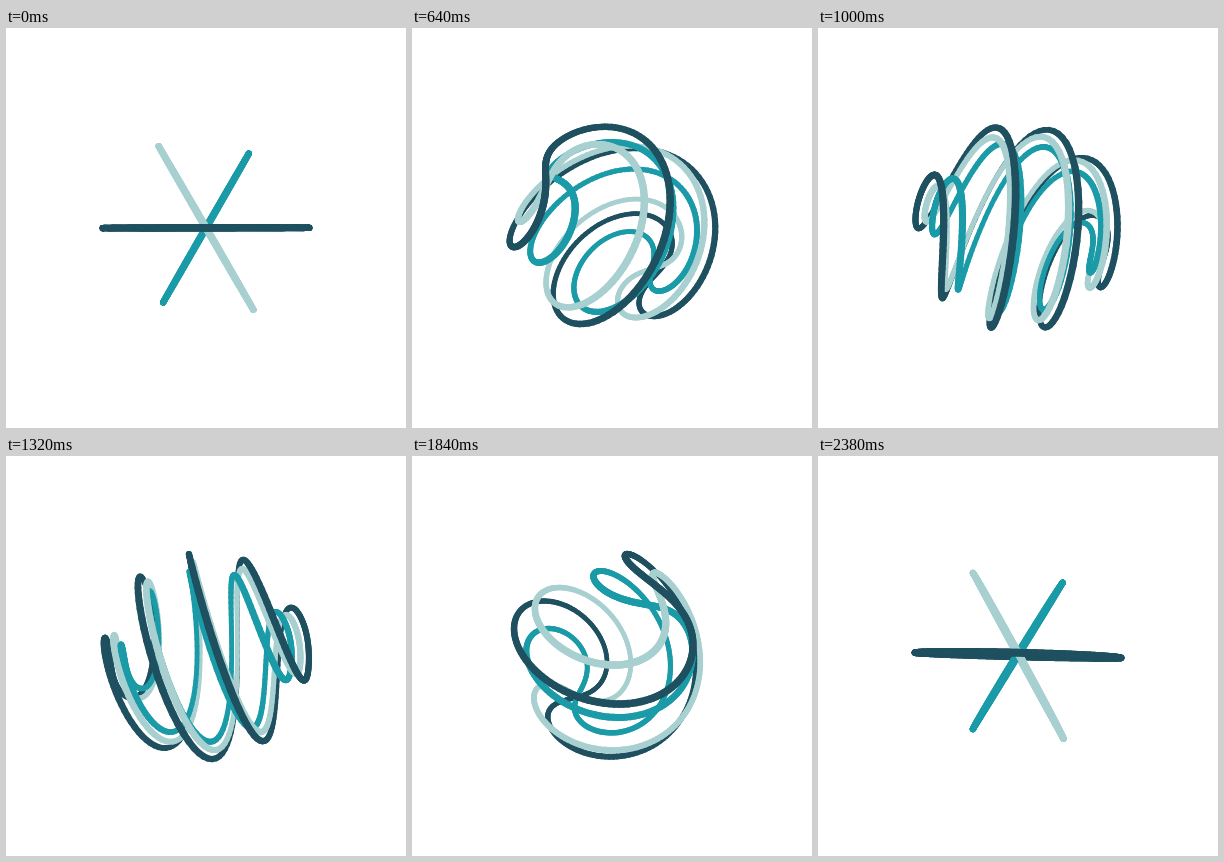
Animation of 400x400 px, one loop 2.4 s. Source, as an HTML page with a canvas:

```html
<!DOCTYPE html>
<html lang="en">
<head>
<meta charset="utf-8">
<title>Twisting rings</title>
<style>
  html, body { margin: 0; width: 100%; height: 100%; overflow: hidden; background: #fff; }
  canvas { display: block; width: 400px; height: 400px; }
</style>
</head>
<body>
<canvas id="stage" width="400" height="400"></canvas>
<script>
const LOOP = 2400;
const STEPS = 360;
const EYE = 400;
const WEIGHT = 5.8;
const TAU = Math.PI * 2;

// fan: start angle of the ring, as a share of 60 degrees
const rings = [
  { radius: 84, color: '#1b9ba8', fan: -1 },
  { radius: 92, color: '#a8d0d0', fan: 1 },
  { radius: 100, color: '#1f5060', fan: 0 }
];

const ctx = document.getElementById('stage').getContext('2d');
ctx.lineCap = 'round';

function easeInOut(p, power) {
  return p < 0.5
    ? 0.5 * Math.pow(2 * p, power)
    : 1 - 0.5 * Math.pow(2 * (1 - p), power);
}

function project(ring, theta, { turn, twist, spread }) {
  const z = Math.sin(theta);
  const flat = Math.cos(theta);
  const angle = ring.fan * spread - twist * (1 + z);
  const x = flat * Math.cos(angle);
  const y = flat * Math.sin(angle);
  const c = Math.cos(turn);
  const s = Math.sin(turn);
  // tip about x, then turn in the picture plane
  const ty = y * c - z * s;
  const depth = (y * s + z * c) * ring.radius;
  const scale = EYE / (EYE - depth);
  return {
    x: 200 + (x * c + ty * s) * ring.radius * scale,
    y: 200 + (ty * c - x * s) * ring.radius * scale,
    depth,
    scale
  };
}

function draw(time) {
  const t = (time % LOOP) / LOOP;
  const pose = {
    turn: Math.PI * t,
    twist: TAU * easeInOut(1 - Math.abs(1 - 2 * t), 2.6),
    spread: Math.PI / 3 * (1 - 2 * easeInOut(t, 1.55))
  };
  const strokes = [];

  for (const ring of rings) {
    let a = project(ring, 0, pose);
    for (let i = 1; i <= STEPS; i++) {
      const b = project(ring, TAU * i / STEPS, pose);
      strokes.push({
        a, b,
        depth: (a.depth + b.depth) / 2,
        width: WEIGHT * (a.scale + b.scale) / 2,
        color: ring.color
      });
      a = b;
    }
  }

  strokes.sort((p, q) => p.depth - q.depth);
  ctx.fillStyle = '#fff';
  ctx.fillRect(0, 0, 400, 400);
  for (const { a, b, width, color } of strokes) {
    ctx.strokeStyle = color;
    ctx.lineWidth = width;
    ctx.beginPath();
    ctx.moveTo(a.x, a.y);
    ctx.lineTo(b.x, b.y);
    ctx.stroke();
  }
}

function tick() {
  draw(performance.now());
  requestAnimationFrame(tick);
}
tick();
</script>
</body>
</html>
```
